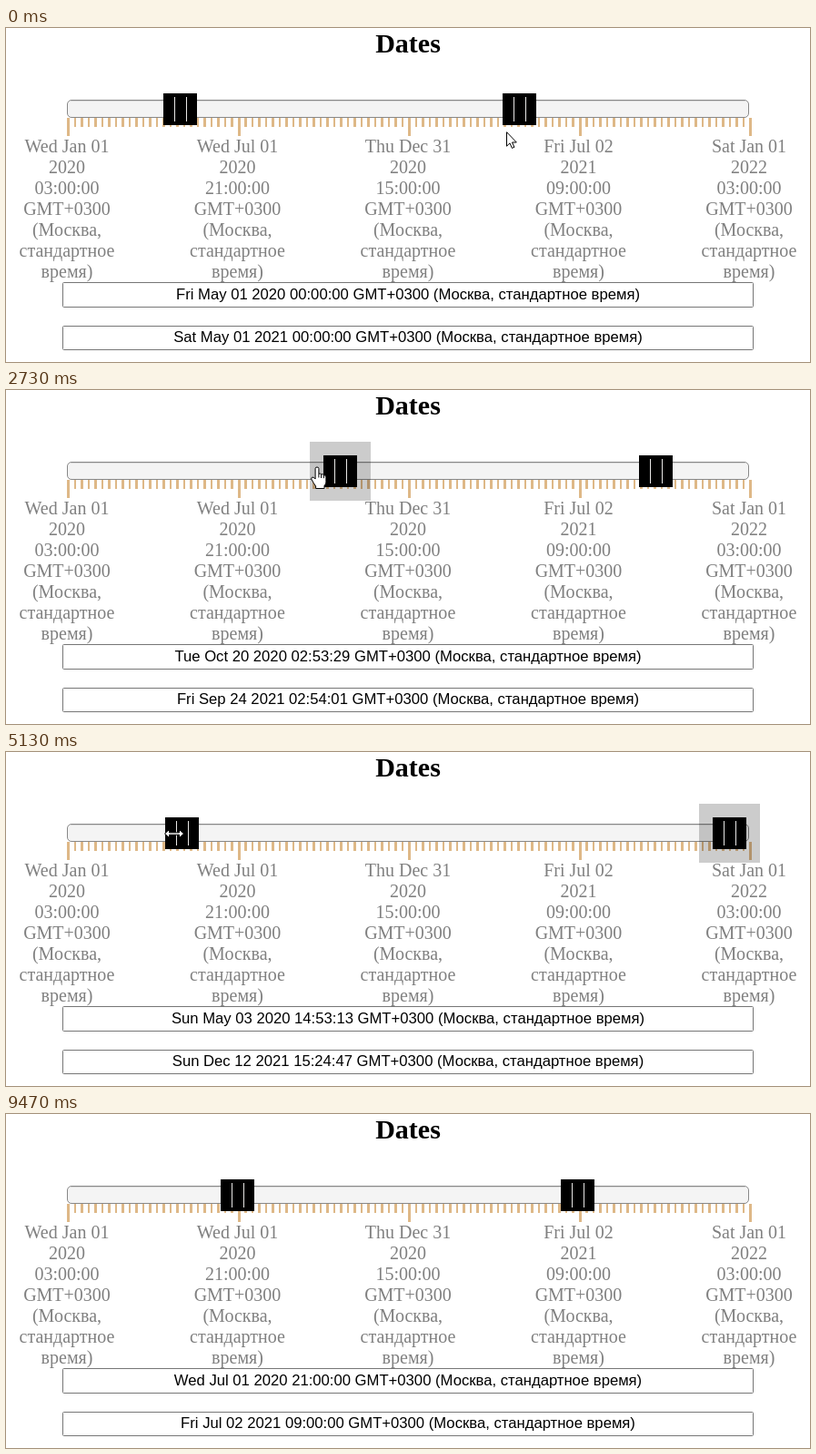
Animation, 884 px wide and 368 px high, one loop 9.74 s. Source, as an HTML page:

```html
<!DOCTYPE html>
<html lang="ru">
<head>
<meta charset="utf-8">
<title>Dates</title>
<style>
  html, body { margin: 0; width: 100%; height: 100%; overflow: hidden; background: #fff; }
  svg { display: block; }
  text { text-anchor: middle; }
  .title { font: bold 30px "Liberation Serif", serif; }
  .label { font: 20px "Liberation Serif", serif; fill: #808080; }
  .value { font: 16.667px "Liberation Sans", sans-serif; }
  .box { fill: #fff; stroke: #767676; }
  .crisp { shape-rendering: crispEdges; }
  .cursor { fill: #fff; stroke: #000; stroke-linejoin: round; }
</style>
</head>
<body>
<svg id="stage" width="884" height="368" viewBox="0 0 884 368">
  <text class="title" x="442" y="27">Dates</text>
  <rect x="67.5" y="79.5" width="749" height="19" rx="4.5" fill="#f4f4f4" stroke="#888"/>
  <path d="M71 80.5H813" stroke="#d8d8d8"/>
  <g id="scale"></g>
  <rect class="box" x="62.5" y="280.5" width="759" height="27" rx="1"/>
  <rect class="box" x="62.5" y="328.5" width="759" height="26" rx="1"/>
  <text class="value" x="442" y="299"></text>
  <text class="value" x="442" y="346"></text>
  <g id="handles"></g>
  <g id="cursors">
    <path class="cursor" d="M.5 .7V16.2L4 12.9 6.4 18.4 8.9 17.3 6.5 12H11.3Z"/>
    <path class="cursor" d="M-1.9 13V1.6Q-1.9 0 0 0T1.9 1.6V7.4Q3.2 6.4 4.6 7.9 6.2 7.1 7.4 8.8 9.9 8.2 9.9 11V16.4Q9.9 18.5 8 20.6V23.5H-1.4V21Q-3.6 18-6 13.6-6.8 11.7-5.3 11.1-3.8 10.7-1.9 13ZM1.9 7.4V11.5M4.6 7.9V12M7.4 8.8V12.2"/>
    <path class="cursor" d="M-10.5 0L-5.5-4.5V-1.2H5.5V-4.5L10.5 0 5.5 4.5V1.2H-5.5V4.5Z"/>
  </g>
</svg>
<script>
const LOOP = 9740, STEP = 1000 / 15;
const parse = s => Date.parse(s + 'Z');
const START = parse('2020-01-01T03:00:00'), END = parse('2022-01-01T03:00:00');
const ZONE = 'GMT+0300 (Москва, стандартное время)';
const $ = id => document.getElementById(id);

function add(parent, tag, attrs, text = '') {
  const el = document.createElementNS('http://www.w3.org/2000/svg', tag);
  for (const name in attrs) el.setAttribute(name, attrs[name]);
  el.textContent = text;
  parent.append(el);
  return el;
}

// "Fri May 01 2020 00:00:00"
function stamp(ms) {
  const [day, date, month, year, time] = new Date(ms).toUTCString().replace(',', '').split(' ');
  return [day, month, date, year, time].join(' ');
}

for (let i = 0; i <= 100; i++) {
  const x = 67 + 7.5 * i, big = i % 25 === 0;
  add($('scale'), 'rect', {
    class: 'crisp', x, y: 99, width: big ? 3 : 2.5, height: big ? 20 : 10, fill: '#deb887'
  });
  if (!big) continue;
  const [day, month, date, year, time] = stamp(START + (END - START) * i / 100).split(' ');
  const lines = [`${day} ${month} ${date}`, year, time, 'GMT+0300', '(Москва,', 'стандартное', 'время)'];
  lines.forEach((s, n) => add($('scale'), 'text', { class: 'label', x, y: 137 + 23 * n }, s));
}

const handles = [0, 1].map(() => {
  const g = add($('handles'), 'g', { class: 'crisp' });
  const halo = add(g, 'path', { d: 'M-15-15H52V50H-15ZM0 0V35H37V0Z', 'fill-opacity': .2 });
  add(g, 'rect', { width: 37, height: 35 });
  for (const x of [12, 25]) add(g, 'rect', { x, y: 4, width: 1, height: 27, fill: '#e8e7e6' });
  return { g, halo };
});

// Dates by step of 1/15 s
const may1 = parse('2020-05-01T00:00:00'), may3 = parse('2020-05-03T14:53:13');
const sep = parse('2021-09-24T02:54:01'), dec12 = parse('2021-12-12T15:24:47');
const dec31 = parse('2020-12-31T15:00:00'), may21 = parse('2021-05-01T00:00:00');
const values = [
  [[0, may1], [23, may1], [31, parse('2021-08-01T20:17:16')], [33, sep], [35, sep],
   [44, may3], [89, may3], [90, dec31], [115, dec31], [116, parse('2020-07-01T21:00:00')]],
  [[0, may21], [6, may21], [13, parse('2021-08-31T17:47:46')], [16, sep], [51, sep],
   [54, parse('2020-08-23T15:30:38')], [55, may3], [56, may3], [64, END], [69, END],
   [72, dec12], [101, dec12], [102, parse('2021-07-02T09:00:00')]]
];

// Clicks on labels: step, handle, first backward swing
const glides = [[90, 0, 0], [102, 1, -.04], [116, 0, -.02]];
const focus = [[0, -1], [7, 1], [23, 0], [51, 1], [90, -1]];

const NONE = -1, ARROW = 0, HAND = 1, RESIZE = 2;
const path = [
  [0, 550, 114, ARROW], [1, 548, 98, RESIZE], [3, 568, 72, RESIZE], [5, 577, 88, RESIZE],
  [7, 580, 90, HAND], [13, 703, 97, HAND], [16, 727, 95, ARROW], [21, 260, 92, RESIZE],
  [22, 203, 90, HAND], [31, 727, 78, HAND], [33, 750, 80, HAND], [35, 750, 80, HAND],
  [43, 206, 86, HAND], [45, 206, 86, ARROW], [50, 726, 84, RESIZE], [51, 722, 84, HAND],
  [54, 159, 82, HAND], [56, 42, 82, HAND], [64, 830, 84, HAND], [69, 830, 84, HAND],
  [72, 808, 86, ARROW], [76, 300, 89, ARROW], [77, 185, 90, RESIZE], [78, 178, 90, RESIZE],
  [81, 185, 92, ARROW], [88, 447, 178, HAND], [92, 447, 178, HAND], [99, 648, 178, HAND],
  [104, 648, 178, HAND], [106, 620, 185, ARROW], [114, 262, 182, HAND], [119, 262, 182, HAND],
  [121, 300, 200, ARROW], [130, 428, 235, ARROW], [134, 428, 235, ARROW], [135, 279, 311, ARROW],
  [136, 0, 0, NONE], [140, 76, 363, ARROW], [141, 76, 364, ARROW], [142, 0, 0, NONE]
];

const last = (keys, k) => keys.findLastIndex(key => key[0] <= k);

function mix(keys, k, col = 1) {
  const i = last(keys, k), a = keys[i], b = keys[i + 1];
  return b ? a[col] + (b[col] - a[col]) * (k - a[0]) / (b[0] - a[0]) : a[col];
}

function place(h, k) {
  const glide = glides.find(([from, who]) => who === h && k >= from && k < from + 3);
  if (!glide) return mix(values[h], k);
  const [from, , swing] = glide;
  const a = mix(values[h], from - 1), b = mix(values[h], from);
  return a + (b - a) * [swing, .15, .75][k - from];
}

const fields = document.querySelectorAll('.value');
const cursors = [...$('cursors').children];
let shown = -1;

function draw(k) {
  const active = focus[last(focus, k)][1];
  handles.forEach(({ g, halo }, h) => {
    const x = Math.round(49 + 748.1 * (place(h, k) - START) / (END - START));
    g.setAttribute('transform', `translate(${x} 72)`);
    halo.style.display = h === active ? '' : 'none';
    fields[h].textContent = `${stamp(mix(values[h], k))} ${ZONE}`;
  });
  if (active >= 0) $('handles').append(handles[active].g);

  const type = path[last(path, k)][3];
  cursors.forEach((el, i) => { el.style.display = i === type ? '' : 'none'; });
  if (type !== NONE) {
    const x = Math.round(mix(path, k)), y = Math.round(mix(path, k, 2));
    cursors[type].setAttribute('transform', `translate(${x} ${y})`);
  }
}

// The picture advances in whole steps
function tick() {
  const k = Math.floor((performance.now() % LOOP + 5) / STEP);
  if (k !== shown) draw(shown = k);
  requestAnimationFrame(tick);
}
tick();
</script>
</body>
</html>
```
